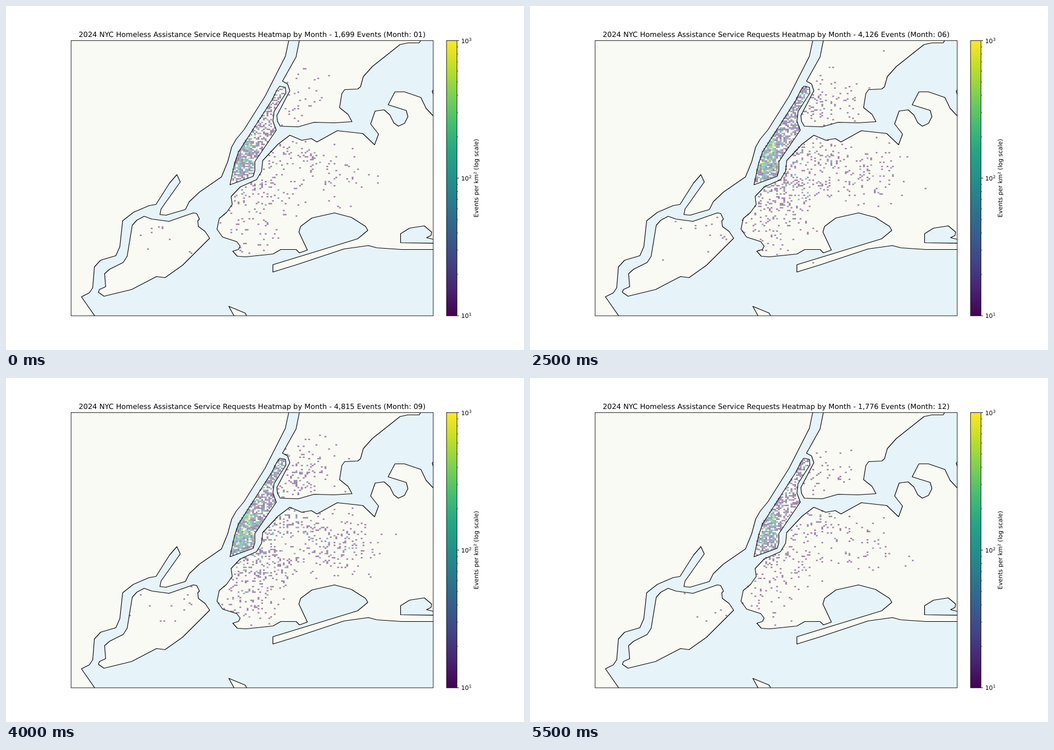
Animation, 917 px wide and 611 px high, one loop 6 s. Source, as an HTML page with a canvas:

```html
<!DOCTYPE html>
<html lang="en">
<head>
<meta charset="utf-8">
<title>Monthly heatmap</title>
<style>
html, body { margin: 0; width: 100%; height: 100%; overflow: hidden; background: #fff; }
canvas { display: block; }
</style>
</head>
<body>
<canvas id="stage" width="917" height="611"></canvas>
<script>
const ctx = document.getElementById('stage').getContext('2d');
const FONT = '"DejaVu Sans", sans-serif';
const BOX = { x: 115.2, y: 61.4, w: 641, h: 488.8 };
const BAR = { x: 779.9, w: 18.4 };
const GRID = 200;
const CELL_W = BOX.w / GRID, CELL_H = BOX.h / GRID;
const CELL_KM2 = 0.083;
const STEP = 500;
const TOTALS = [1699, 1731, 2252, 2948, 3717, 4126, 4608, 4792, 4815, 4584, 2963, 1776];
const VIRIDIS = ['#440154', '#482475', '#414487', '#355f8d', '#2a788e', '#21918c',
  '#22a884', '#44bf70', '#7ad151', '#bddf26', '#fde725'];

// Key points of each coast; open ends run past the frame and are clipped.
const mainland = coast(`500,55 500,61 494,89 458,160 421,219 407,236 399,250 392,276 381,303
  342,330 324,347 317,361 283,371 272,370 274,360 308,312 302,299 289,314 265,352 253,354
  225,366 206,381 201,427 194,443 167,451 156,463 153,500 147,509 133,516 158,552 105,560 105,50`);
const bronx = coast(`520,55 513,90 489,133 498,138 502,150 479,194 480,204 485,213 517,214
  545,206 580,207 612,205 605,192 590,180 594,155 599,148 622,147 627,143 632,125 648,107
  697,68 711,65 731,65 737,55`);
const manhattan = coast(`484,142 494,144 495,154 474,187 472,204 478,220 440,276 440,292
  437,302 396,317 404,280 411,259 470,167 479,149`);
const longIsland = coast(`400,352 398,338 414,321 443,308 452,293 454,274 481,245 502,229
  523,238 540,235 550,241 586,221 631,226 652,246 659,227 645,209 653,186 669,184 679,193
  686,207 694,213 705,208 711,196 708,185 676,175 688,152 705,152 734,162 743,181 755,194
  765,200 765,416 744,411 752,407 753,401 740,390 714,394 698,404 698,420 765,421 765,432
  700,432 656,429 641,425 598,431 514,459 472,472 472,459 622,413 640,398 636,391 611,375
  581,367 541,376 521,391 518,401 533,433 519,438 513,432 486,432 472,440 424,445 409,444
  401,435 411,432 414,426 408,418 383,410 373,396 377,377 390,366`);
const staten = coast(`244,373 258,378 288,382 331,367 337,368 342,378 339,381 340,391 352,400
  360,412 312,460 281,482 266,480 222,503 173,515 163,508 165,503 176,498 174,475 183,467
  207,455 214,444 223,389 231,380`);
const hook = coast('394,533 423,545 428,555 406,555');
const islet = coast('762,140 754,151 762,172');
const LAND = [mainland, bronx, manhattan, longIsland, staten, hook, islet];

// Request density inside each group of shores; share is its part of the total.
const ZONES = [
  { shores: [manhattan], share: .82, spread: 1.2, density: (x, y) =>
    25 * bump(x, y, 428, 251, 4, 8) + 6 * bump(x, y, 416, 283, 14, 20) + 1.6 },
  { shores: [bronx], share: .025, spread: 1.1, density: (x, y) =>
    bump(x, y, 508, 170, 20, 26) + .3 * bump(x, y, 550, 155, 26, 26) },
  { shores: [longIsland], share: .152, spread: 1.35, density: (x, y) =>
    bump(x, y, 455, 322, 32, 20) + .6 * bump(x, y, 505, 260, 32, 14) +
    .4 * bump(x, y, 590, 300, 34, 25) + .35 * bump(x, y, 430, 385, 30, 32) },
  { shores: [staten], share: .003, spread: 1, density: (x, y) => bump(x, y, 310, 395, 50, 35) }
];

function coast(text) {
  return new Path2D('M' + text.trim().split(/\s+/).join('L') + 'Z');
}

function bump(x, y, cx, cy, sx, sy) {
  return Math.exp(-(((x - cx) / sx) ** 2 + ((y - cy) / sy) ** 2) / 2);
}

function rng(seed) {
  return () => {
    seed = (seed + 0x6D2B79F5) | 0;
    let t = Math.imul(seed ^ (seed >>> 15), 1 | seed);
    t = (t + Math.imul(t ^ (t >>> 7), 61 | t)) ^ t;
    return ((t ^ (t >>> 14)) >>> 0) / 4294967296;
  };
}

function poisson(mean, rand) {
  const limit = Math.exp(-mean);
  let n = 0;
  for (let p = rand(); p > limit; p *= rand()) n++;
  return n;
}

// Every cell keeps its own bias, so busy places stay busy all year.
function zoneCells({ shores, share, spread, density }) {
  const rand = rng(2024);
  const found = [];
  let sum = 0;
  for (let j = 0; j < GRID; j++) {
    for (let i = 0; i < GRID; i++) {
      const x = BOX.x + (i + .5) * CELL_W, y = BOX.y + (j + .5) * CELL_H;
      if (!shores.some(p => ctx.isPointInPath(p, x, y))) continue;
      const z = Math.sqrt(-2 * Math.log(1 - rand())) * Math.cos(2 * Math.PI * rand());
      const weight = density(x, y) * Math.exp(spread * z);
      sum += weight;
      found.push({ i, j, weight });
    }
  }
  return found.map(c => ({ ...c, weight: c.weight * share / sum }));
}

const cells = ZONES.flatMap(zoneCells);
const months = TOTALS.map((total, m) => {
  const rand = rng(77 + m * 101);
  return cells
    .map(({ i, j, weight }) => ({ i, j, n: poisson(weight * total, rand) }))
    .filter(c => c.n > 0);
});

function viridis(v) {
  const s = Math.max(0, Math.min(1, v)) * (VIRIDIS.length - 1);
  const k = Math.min(VIRIDIS.length - 2, Math.floor(s));
  const part = (hex, c) => parseInt(hex.slice(1 + 2 * c, 3 + 2 * c), 16);
  const rgb = [0, 1, 2].map(c => {
    const a = part(VIRIDIS[k], c);
    return Math.round(a + (part(VIRIDIS[k + 1], c) - a) * (s - k));
  });
  return `rgb(${rgb})`;
}

function write(text, x, y, size, align = 'left') {
  ctx.font = `${size}px ${FONT}`;
  ctx.textRendering = 'geometricPrecision';
  ctx.textAlign = align;
  ctx.fillStyle = '#000';
  ctx.fillText(text, x, y);
}

function eachLand(paint) {
  ctx.save();
  ctx.translate(.5, .5);
  LAND.forEach(paint);
  ctx.restore();
}

function drawMap(month) {
  ctx.save();
  ctx.beginPath();
  ctx.rect(BOX.x, BOX.y, BOX.w, BOX.h);
  ctx.clip();
  ctx.fillStyle = '#e6f3f8';
  ctx.fillRect(BOX.x, BOX.y, BOX.w, BOX.h);
  ctx.fillStyle = '#fafaf4';
  eachLand(p => ctx.fill(p));
  ctx.globalAlpha = .5;
  for (const { i, j, n } of months[month]) {
    ctx.fillStyle = viridis(Math.log10(n / CELL_KM2 / 10) / 2);
    ctx.fillRect(BOX.x + i * CELL_W, BOX.y + j * CELL_H, CELL_W, CELL_H);
  }
  ctx.globalAlpha = 1;
  ctx.lineWidth = 1.15;
  ctx.lineJoin = 'round';
  eachLand(p => ctx.stroke(p));
  ctx.restore();
  ctx.lineWidth = .85;
  ctx.strokeRect(BOX.x, BOX.y, BOX.w, BOX.h);
}

function tick(value, length, width) {
  const y = BOX.y + BOX.h * (3 - Math.log10(value)) / 2;
  ctx.lineWidth = width;
  ctx.beginPath();
  ctx.moveTo(BAR.x + BAR.w, y);
  ctx.lineTo(BAR.x + BAR.w + length, y);
  ctx.stroke();
  return y;
}

function drawBar() {
  const fill = ctx.createLinearGradient(0, BOX.y + BOX.h, 0, BOX.y);
  VIRIDIS.forEach((c, k) => fill.addColorStop(k / (VIRIDIS.length - 1), c));
  ctx.fillStyle = fill;
  ctx.fillRect(BAR.x, BOX.y, BAR.w, BOX.h);
  ctx.lineWidth = .85;
  ctx.strokeRect(BAR.x, BOX.y, BAR.w, BOX.h);
  for (let e = 1; e <= 3; e++) {
    const y = tick(10 ** e, 3.7, .85);
    write('10', 805.7, y + 4.2, 10.6);
    write(e, 819.5, y + .2, 7.4);
    for (let k = 2; k < 10 && e < 3; k++) tick(k * 10 ** e, 2.1, .64);
  }
  ctx.save();
  ctx.translate(836, 305.8);
  ctx.rotate(-Math.PI / 2);
  write('Events per km² (log scale)', 0, 0, 10.6, 'center');
  ctx.restore();
}

function draw(month) {
  ctx.fillStyle = '#fff';
  ctx.fillRect(0, 0, 917, 611);
  ctx.strokeStyle = '#000';
  drawMap(month);
  drawBar();
  const count = TOTALS[month].toLocaleString('en-US');
  const label = String(month + 1).padStart(2, '0');
  write(`2024 NYC Homeless Assistance Service Requests Heatmap by Month - ${count} Events (Month: ${label})`,
    435.7, 54.8, 12.73, 'center');
}

const start = performance.now();
let shown = -1;
function frame() {
  const month = Math.floor((performance.now() - start) / STEP) % TOTALS.length;
  if (month !== shown) draw(shown = month);
  requestAnimationFrame(frame);
}
frame();
</script>
</body>
</html>
```
